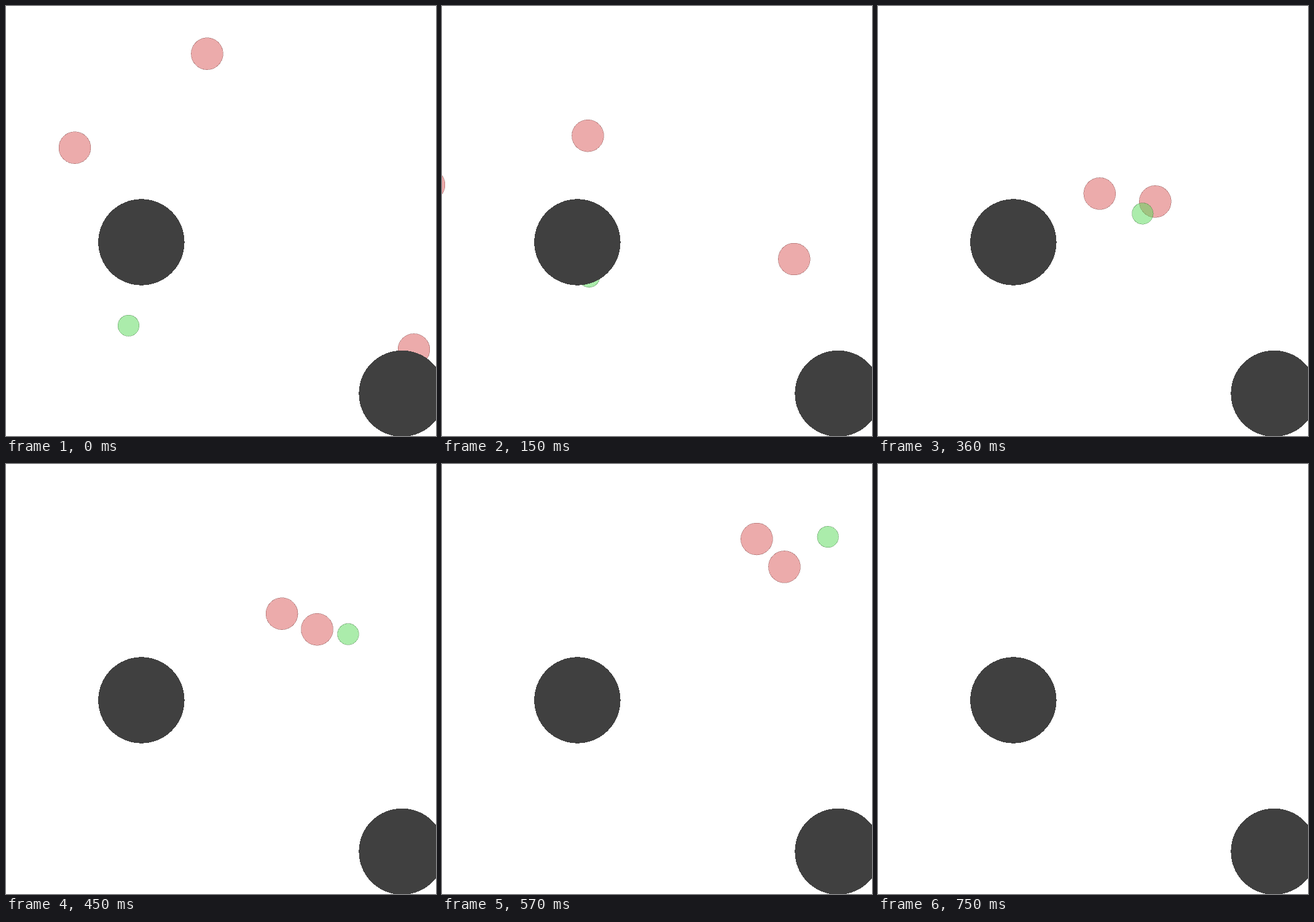
Recreate the animation shown at these times as an HTML page. Size 700 by 700 pixels, loop 780 ms.

```html
<!DOCTYPE html>
<html lang="en">
<head>
<meta charset="utf-8">
<title>Pursuit</title>
<style>
  html, body { margin: 0; width: 100%; height: 100%; overflow: hidden; background: #fff; }
  svg { display: block; shape-rendering: crispEdges; }
  .chaser { r: 26px; fill: rgba(217, 89, 89, .5); stroke: rgba(108, 44, 44, .36); }
  .runner { r: 17.3px; fill: rgba(89, 217, 89, .5); stroke: rgba(44, 108, 44, .36); }
  .obstacle { r: 70.2px; fill: #404040; }
</style>
</head>
<body>
<svg width="700" height="700" viewBox="0 0 700 700">
  <circle class="chaser"/>
  <circle class="chaser"/>
  <circle class="chaser"/>
  <circle class="runner"/>
  <circle class="obstacle" cx="220.4" cy="384.5"/>
  <circle class="obstacle" cx="644.6" cy="630.9"/>
</svg>
<script>
const STEP = 30, STEPS = 26;

// Points each agent passes through at the shared key steps
const keys = [0, 5, 9, 15, 17, 21];
const routes = [
  [[112, 230.7], [-21, 291]],
  [[327.4, 77.7], [237.4, 211.2], [280, 314.7], [449.1, 243.7], [490.6, 187.3], [526.2, 53.2]],
  [[664, 559.4], [573.3, 412], [446.3, 361], [506.5, 269.2], [549, 231.3], [552.2, 93.1]],
  [[199.5, 520.3], [239.5, 440.7], [310.4, 376.7], [557, 277], [612, 205.4], [629, 25.8]]
];

// Smooth curve through the values; it runs on straight after the last one
function curve(values) {
  const last = values.length - 1;
  const span = i => keys[i + 1] - keys[i];
  const slope = i => (values[i + 1] - values[i]) / span(i);
  const speed = i => {
    if (i === last) return slope(last - 1);
    if (i === 0) return last > 1 ? 2 * slope(0) - speed(1) : slope(0);
    return (slope(i - 1) * span(i) + slope(i) * span(i - 1)) / (span(i - 1) + span(i));
  };
  return s => {
    if (s >= keys[last]) return values[last] + speed(last) * (s - keys[last]);
    const i = keys.findLastIndex(k => k <= s);
    const d = span(i), u = (s - keys[i]) / d, w = 1 - u;
    return w * w * (1 + 2 * u) * values[i] + u * u * (1 + 2 * w) * values[i + 1] +
      d * u * w * (w * speed(i) - u * speed(i + 1));
  };
}

const circles = document.querySelectorAll('circle');
const movers = routes.map((route, i) => ({
  node: circles[i],
  x: curve(route.map(p => p[0])),
  y: curve(route.map(p => p[1]))
}));

const start = performance.now();
function tick() {
  const step = Math.floor((performance.now() - start) / STEP) % STEPS;
  for (const { node, x, y } of movers) {
    node.setAttribute('cx', x(step));
    node.setAttribute('cy', y(step));
  }
  requestAnimationFrame(tick);
}
tick();
</script>
</body>
</html>
```
